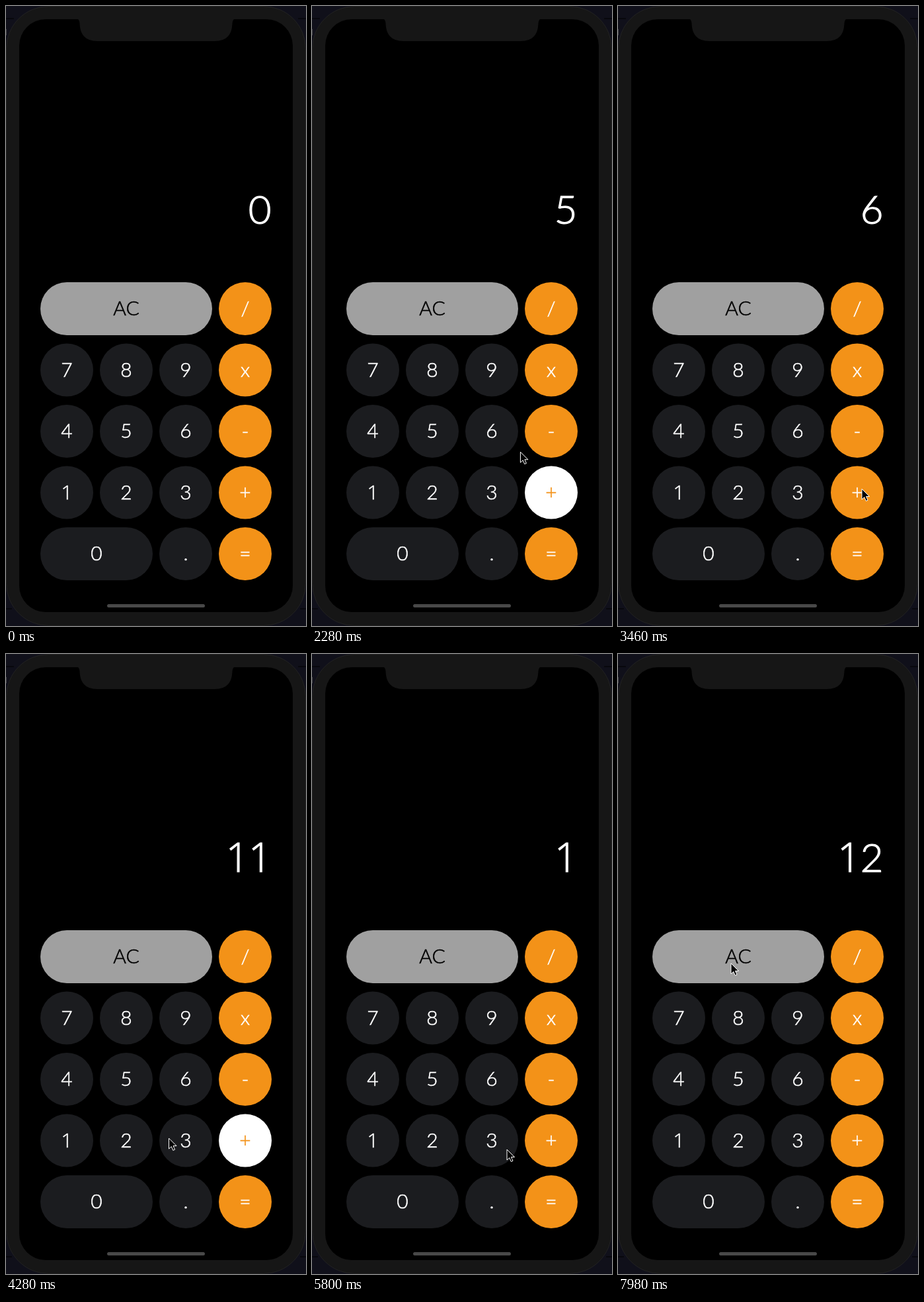
Animation, 454 px wide and 936 px high, one loop 8000 ms. Source, as an HTML page:

```html
<!DOCTYPE html>
<html lang="en">
<head>
<meta charset="utf-8">
<title>Calculator</title>
<style>
  html, body { margin: 0; width: 100%; height: 100%; overflow: hidden; background: #10101a; }
  svg { display: block; width: 454px; height: 936px; }
  text {
    font-family: Lato, "Open Sans", sans-serif; font-weight: 300;
    color: #fff; fill: currentColor; stroke: currentColor; stroke-width: .02em;
  }
  .one { font-family: "Open Sans", sans-serif; }
  .key { font-size: 30px; text-anchor: middle; }
  #display { font-size: 60px; text-anchor: end; }
</style>
</head>
<body>
<svg viewBox="0 0 454 936">
  <path d="M0 19H12M442 19H454M0 910H9M445 910H454" stroke="#000"/>
  <rect x=".5" y=".5" width="453" height="935" rx="64" fill="#161616" stroke="#222"/>
  <text x="-4" y="44" font-size="13" style="color:#777" class="one">1</text>
  <rect x="20" y="20" width="414" height="895" rx="40"/>
  <path d="M107 19Q111 20 111.500 26Q112 53 138 53H316Q342 53 342.500 26Q343 20 347 19Z" fill="#161616"/>
  <rect x="153" y="903" width="148" height="5" rx="2.500" fill="#484848"/>
  <text id="display" x="401.500" y="328.500"></text>
  <g id="keys"></g>
  <path id="cursor" d="M0 0V16L3.800 12.500L6.300 18.300L9 17.100L6.500 11.500H11.500Z" stroke="#fff" stroke-linejoin="round"/>
</svg>
<script>
const LOOP = 8000, FADE = 320;
const WHITE = [255, 255, 255], ORANGE = [243, 146, 24];
const rgb = c => `rgb(${c.map(Math.round)})`;
const mix = (a, b, k) => a.map((v, i) => v + (b[i] - v) * k);
const clamp = v => Math.min(1, Math.max(0, v));
const smooth = v => v * v * (3 - 2 * v);
const byId = id => document.getElementById(id);

function svg(name, attributes, parent) {
  const node = document.createElementNS('http://www.w3.org/2000/svg', name);
  for (const key in attributes) node.setAttribute(key, attributes[key]);
  return parent.appendChild(node);
}

// Each row lists [label, columns spanned].
const rows = [
  [['AC', 3], ['/', 1]],
  [['7', 1], ['8', 1], ['9', 1], ['x', 1]],
  [['4', 1], ['5', 1], ['6', 1], ['-', 1]],
  [['1', 1], ['2', 1], ['3', 1], ['+', 1]],
  [['0', 2], ['.', 1], ['=', 1]]
];
const keys = {};
rows.forEach((row, r) => {
  let column = 0;
  for (const [label, span] of row) {
    const x = 52 + column * 90, y = 417 + r * 92.5, width = span * 90 - 10;
    const operator = column === 3;
    const fill = label === 'AC' ? '#a0a0a0' : operator ? rgb(ORANGE) : '#1b1c1f';
    const shape = svg('rect', { x, y, width, height: 80, rx: 40, fill }, byId('keys'));
    const text = svg('text', { x: x + width / 2, y: y + 50, class: label === '1' ? 'key one' : 'key' }, byId('keys'));
    text.textContent = label;
    if (label === 'AC') text.style.color = '#000';
    keys[label] = { shape, text };
    column += span;
  }
});

// [time, key, text shown afterwards]
const presses = [
  [1170, '5', '5'], [1700, '+', '5'], [2912, '6', '6'],
  [3700, '+', '11'], [5028, '1', '1'], [6400, '=', '12']
];
const plusActive = [[1700, 2912], [3700, 5028]];

// [time, x, y] of the pointer tip
const path = [
  [250, 456, 790], [900, 186, 640], [1180, 186, 640], [1420, 338, 714],
  [1620, 362, 727], [1900, 362, 727], [2650, 271, 622], [3080, 271, 622],
  [3460, 369, 729], [3950, 369, 729], [4700, 72, 734], [5250, 72, 734],
  [5800, 295, 748], [6150, 385, 812], [7200, 385, 812], [7400, 398, 789],
  [7940, 171, 467], [8000, 171, 467]
];

function pointerAt(t) {
  const i = Math.max(1, path.findIndex(point => point[0] >= t));
  const [t0, ...from] = path[i - 1], [t1, ...to] = path[i];
  return mix(from, to, smooth(clamp((t - t0) / (t1 - t0))));
}

function labelOpacity(label, t) {
  let opacity = 1;
  for (const [time, key] of presses) {
    if (key !== label || t < time - 100 || t > time + FADE) continue;
    opacity = t < time ? 1 - 0.75 * (t - time + 100) / 100 : 0.25 + 0.75 * smooth((t - time) / FADE);
  }
  return opacity;
}

function drawPlus(t) {
  let glow = 0, active = false;
  for (const [on, off] of plusActive) {
    if (t < on || t > off + FADE) continue;
    active = t < off;
    glow = active ? clamp((t - on) / 120) : 1 - smooth((t - off) / FADE);
  }
  keys['+'].shape.setAttribute('fill', rgb(mix(ORANGE, WHITE, glow)));
  keys['+'].text.style.color = rgb(active ? ORANGE : WHITE);
}

let shown;
function showNumber(value) {
  if (value === shown) return;
  shown = value;
  byId('display').replaceChildren();
  for (const digit of value) {
    svg('tspan', digit === '1' ? { class: 'one' } : {}, byId('display')).textContent = digit;
  }
}

function draw(now) {
  const t = now % LOOP;
  const last = presses.filter(([time]) => time <= t).pop();
  showNumber(last ? last[2] : '0');
  for (const label of ['5', '6', '1', '=']) keys[label].text.style.opacity = labelOpacity(label, t);
  drawPlus(t);
  byId('cursor').setAttribute('transform', `translate(${pointerAt(t)})`);
  requestAnimationFrame(draw);
}
draw(0);
</script>
</body>
</html>
```
